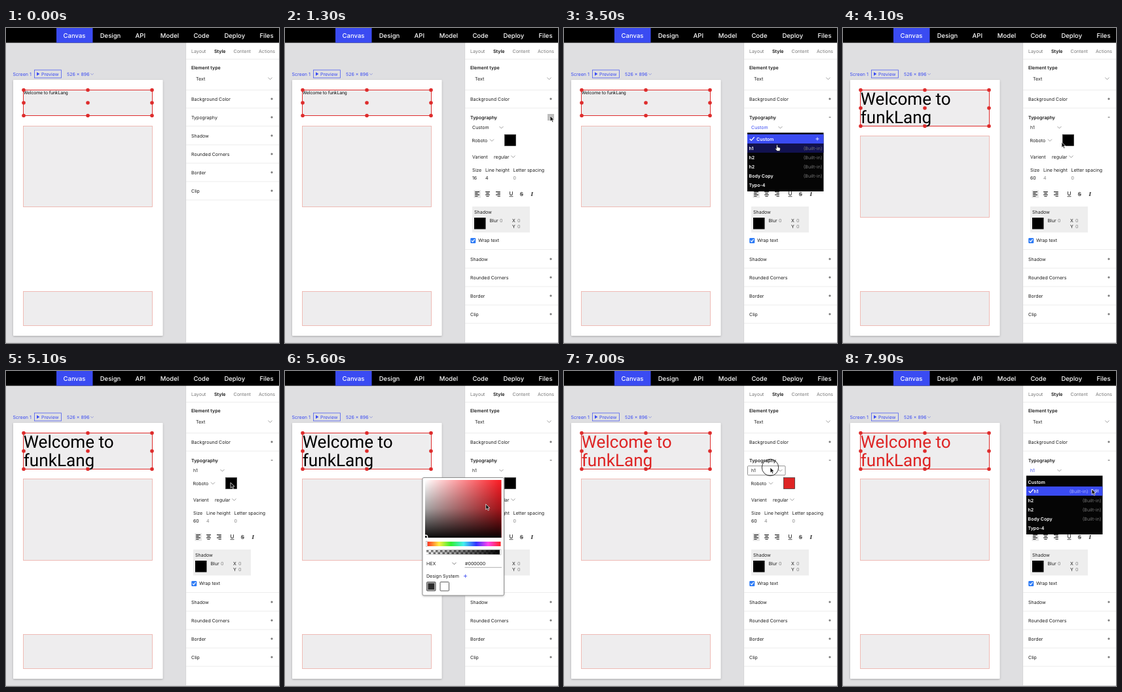
An HTML page that plays this animation: 417x480 px, repeating every 8 s.

```html
<!DOCTYPE html>
<html lang="en">
<head>
<meta charset="utf-8">
<title>Typography panel</title>
<style>
html, body { margin: 0; width: 100%; height: 100%; overflow: hidden; background: #dfdfe1; }
svg { display: block; width: 417px; height: 480px; font-family: Inter, Roboto, sans-serif; text-rendering: geometricPrecision; }
</style>
</head>
<body>
<svg id="stage" viewBox="0 0 417 480" xmlns="http://www.w3.org/2000/svg">
  <defs>
    <linearGradient id="tint"><stop stop-color="#fff"/><stop offset="1" stop-color="#fb1a22"/></linearGradient>
    <linearGradient id="shade" x2="0" y2="1"><stop stop-color="#000" stop-opacity="0"/><stop offset=".5" stop-opacity=".36"/><stop offset="1" stop-opacity=".96"/></linearGradient>
    <linearGradient id="hue"><stop stop-color="#f22"/><stop offset=".17" stop-color="#fe4"/><stop offset=".33" stop-color="#3e3"/><stop offset=".5" stop-color="#4ee"/><stop offset=".67" stop-color="#33f"/><stop offset=".83" stop-color="#f4e"/><stop offset="1" stop-color="#f22"/></linearGradient>
    <linearGradient id="fade"><stop stop-color="#de2424" stop-opacity="0"/><stop offset="1" stop-color="#de2424"/></linearGradient>
    <linearGradient id="fadeBlack"><stop stop-opacity="0"/><stop offset="1"/></linearGradient>
    <pattern id="checker" width="7" height="7" patternUnits="userSpaceOnUse" x="216" y="272.5"><path d="M0 0h3.5v7h3.5v-3.5h-7z" fill="#777"/></pattern>
    <filter id="soft" x="-20%" y="-20%" width="140%" height="140%"><feDropShadow dx="0" dy="1" stdDeviation="1.8" flood-opacity=".25"/></filter>
  </defs>
  <g id="scene"></g>
</svg>
<script>
const LOOP = 8000, STEP = 100;
const BLUE = '#3a4bf2', RED = '#de2c2c', INK = '#1c1c1c', MUTED = '#858585';
const scene = document.getElementById('scene');

// Moments at which the interface changes
const EXPAND = 1100, OPEN = 2200, CHOOSE = 3600, PICKER = 5300, PICK = 5700, DISMISS = 6500, REOPEN = 7100;

// Pointer path: time, x, y
const PATH = [
  [600, 372, 178], [1000, 405, 134], [1400, 405, 134], [1900, 316, 149], [2300, 316, 150],
  [2900, 328, 168], [3400, 325, 178], [3700, 325, 178], [4500, 343, 170], [5300, 343, 170],
  [5700, 300, 209], [5900, 303, 203], [6100, 307, 197], [6400, 343, 236], [6500, 343, 236],
  [6900, 315, 147], [7200, 315, 147], [7800, 380, 180], [8000, 380, 180]
];

const rect = (x, y, w, h, fill, extra = '') =>
  `<rect x="${x}" y="${y}" width="${w}" height="${h}" fill="${fill}" ${extra}/>`;
const path = (d, stroke, width = 0.8, fill = 'none') =>
  `<path d="${d}" fill="${fill}" stroke="${stroke}" stroke-width="${width}"/>`;
// y is the vertical middle of the line
const text = (x, y, str, { size = 7.05, fill = INK, weight = 400, anchor = 'start', extra = '' } = {}) =>
  `<text x="${x}" y="${y + size * 0.36}" font-size="${size}" fill="${fill}" font-weight="${weight}" text-anchor="${anchor}" ${extra}>${str}</text>`;
const chevron = (x, y, color = '#777', r = 3) =>
  path(`M${x - r} ${y - r / 2}L${x} ${y + r / 2}L${x + r} ${y - r / 2}`, color, 0.7);
const plus = (x, y, color = '#333', r = 1.7) => path(`M${x - r} ${y}h${2 * r}M${x} ${y - r}v${2 * r}`, color);
const rule = y => path(`M275 ${y}H417`, '#ececec', 1);
const check = (x, y) => path(`M${x} ${y}l2.3 2.4l4.6 -5.2`, '#fff', 1.3);

function pointerAt(t) {
  if (t < PATH[0][0]) return null;
  const i = Math.max(1, PATH.findIndex(p => p[0] >= t));
  const [t0, x0, y0] = PATH[i - 1], [t1, x1, y1] = PATH[i];
  const k = (t - t0) / (t1 - t0), e = k * k * (3 - 2 * k);
  return { x: x0 + (x1 - x0) * e, y: y0 + (y1 - y0) * e };
}

function navBar() {
  const items = [['Canvas', 104.5], ['Design', 159.5], ['API', 205.3], ['Model', 250], ['Code', 298.5], ['Deploy', 349.3], ['Files', 398]];
  return rect(0, 0, 417, 22.5, '#000') + rect(77, 0, 55.5, 22.5, BLUE) +
    items.map(([s, x]) => text(x, 11.5, s, { size: 9.5, fill: '#fff', weight: 500, anchor: 'middle' })).join('');
}

function artboard(s) {
  const frame = (y, h) => rect(26.5, y, 197, h, '#eeedee', 'stroke="#eeb4ae" stroke-width=".9"');
  const bottom = s.large ? 149.5 : 133.5, mid = (94.5 + bottom) / 2;
  const roboto = 'font-family="Roboto, sans-serif"';
  const dots = [94.5, mid, bottom].flatMap(y => [27, 125, 223].map(x => [x, y]))
    .filter(([x, y]) => y !== mid || x !== 0);
  const words = s.large
    ? text(26.8, 107.6, 'Welcome to', { size: 26.1, fill: s.color, extra: roboto }) +
      text(26.8, 135.4, 'funkLang', { size: 26.1, fill: s.color, extra: roboto })
    : text(27, 98.2, 'Welcome to funkLang', { size: 7, fill: '#111', extra: roboto });
  return rect(0, 22, 275, 458, '#dfdfe1') +
    text(10.5, 70.2, 'Screen 1', { fill: BLUE }) +
    rect(43.5, 64, 41, 12, 'none', `stroke="${BLUE}" stroke-width=".7"`) +
    path('M47 67.3l4.4 2.7l-4.4 2.7z', 'none', 0, BLUE) +
    text(54, 70, 'Preview', { fill: BLUE }) +
    text(93, 70.2, '526 × 896', { fill: BLUE }) + chevron(131.5, 70.3, '#7780d8', 2.2) +
    rect(11, 79, 228.5, 390, '#fff', 'rx="1" filter="url(#soft)"') +
    frame(s.large ? 164.5 : 149.5, s.large ? 124 : 123) + frame(401.5, 52) +
    rect(26.5, 94.5, 197, bottom - 94.5, '#eeedee', `stroke="${RED}" stroke-width="1"`) + words +
    dots.map(([x, y]) => `<circle cx="${x}" cy="${y}" r="2.8" fill="${RED}"/>`).join('');
}

function typography(s) {
  const gray = { fill: MUTED };
  const alignIcon = (x, shift) => path([0, 1, 2, 3].map(i => {
    const w = i % 2 ? 4.3 : 6.8;
    return `M${x + (6.8 - w) * shift} ${249.6 + i * 2.3}h${w}`;
  }).join(''), '#333', 1.2);
  return text(286, 151.5, s.style, { fill: s.menu ? BLUE : INK }) + chevron(330.5, 151.5) +
    (s.hoverSelect ? rect(280.5, 144.7, 57.5, 14, 'none', 'rx="1" stroke="#777" stroke-width=".8"') : '') +
    text(285.5, 171, 'Roboto') + chevron(316, 171) +
    rect(335.5, 162.5, 17, 17, s.color, 'stroke="#333" stroke-width=".7"') +
    text(286, 196, 'Varient') + text(319, 196, 'regular') + chevron(348.5, 196) +
    text(286, 216, 'Size') + text(306, 216, 'Line height') + text(348.5, 216, 'Letter spacing') +
    text(286, 228.5, s.large ? '60' : '16') + text(306, 228.5, '4', s.large ? gray : {}) + text(348.5, 228.5, '0', gray) +
    rect(288.5, 247, 10.5, 12, '#e7e7e7') +
    alignIcon(290.2, 0) + alignIcon(306.1, 0.5) + alignIcon(322, 1) +
    text(345.5, 252.5, 'U', { size: 8, weight: 500, anchor: 'middle', extra: 'text-decoration="underline"' }) +
    text(361.3, 253, 'S', { size: 8, weight: 500, anchor: 'middle', extra: 'text-decoration="line-through"' }) +
    text(377.3, 253, 'I', { size: 9, weight: 700, anchor: 'middle', extra: 'font-style="italic" font-family="Liberation Serif, serif"' }) +
    rect(286, 272, 88, 39.5, '#eee') + text(289, 280.5, 'Shadow') + rect(289, 289, 17.5, 17.5, '#000') +
    text(312.5, 293, 'Blur') + text(328, 293, '0', gray) +
    text(347, 293, 'X') + text(355, 293, '0', gray) + text(347, 302.3, 'Y') + text(355, 302.3, '0', gray) +
    rect(283.3, 320, 8, 8, '#2d7bf6', 'rx="1.3"') + path('M285 323.9l1.7 1.9l3 -3.9', '#fff', 1.2) +
    text(295, 323.8, 'Wrap text');
}

function panel(s) {
  const tabs = [['Layout', 283], ['Style', 318], ['Content', 347.5], ['Actions', 386]];
  const row = (label, y) => text(283, y, label) + plus(406, y) + rule(y + 14);
  const shift = s.expanded ? 188 : 0;
  return rect(275, 22, 142, 458, '#fff') + path('M274.7 22V480', '#cfcfd2', 0.6) +
    tabs.map(([label, x], i) => text(x, 35, label, i === 1 ? { weight: 600, fill: '#111' } : { fill: '#777' })).join('') +
    rule(47.5) +
    text(283, 60.3, 'Element type', { weight: 600 }) + text(290, 77, 'Text') + chevron(403.5, 77) +
    rule(94.5) + row('Background Color', 108) +
    (s.pressed ? rect(401, 131, 10, 10, '#bdbdbd') : '') +
    text(283, 136, 'Typography', { weight: s.expanded ? 600 : 400 }) +
    (s.expanded ? path('M404.7 136h2.8', '#333') + typography(s) : plus(406, 136)) +
    rule(149.5 + shift) +
    ['Shadow', 'Rounded Corners', 'Border', 'Clip'].map((label, i) => row(label, 164 + shift + 28 * i)).join('');
}

function menu(s) {
  const rows = ['Custom', 'h1', 'h2', 'h2', 'Body Copy', 'Typo-4'];
  const hover = Math.floor((s.pointer.y - 160) / 14);
  return rect(280, 159.5, 116.5, 89.5, '#050505') + rows.map((label, i) => {
    const y = 169 + 14 * i, chosen = i === (s.large ? 1 : 0);
    const back = chosen ? BLUE : i === hover ? '#12124f' : '';
    const x = !chosen ? 282.5 : i ? 291.5 : 294;
    const builtIn = i > 0 && i < 5;
    return (back ? rect(280, y - 7, 116.5, 14, back) : '') + (chosen ? check(283.8, y) : '') +
      text(x, y, label, { fill: '#fff', weight: 600 }) +
      (builtIn ? text(chosen ? 374.5 : 394.5, y, '(Built-in)', { fill: chosen ? '#a9b1fa' : '#777', anchor: 'end' }) : '') +
      (chosen ? (i ? text(379, y, 'Edit', { fill: '#fff', size: 6.5 }) : plus(387, y, '#fff', 2.5)) : '');
  }).join('');
}

function picker(s) {
  const ring = s.picked ? [300.5, 209.5] : [215, 253];
  const swatch = (x, fill, edge) =>
    rect(x, 321.5, 13.5, 13.5, edge, 'rx="1" stroke="#333" stroke-width=".8"') + rect(x + 2, 323.5, 9.5, 9.5, fill);
  return rect(210, 162.5, 124.5, 179.5, '#fff', 'rx="2" stroke="#777" stroke-width=".8" filter="url(#soft)"') +
    rect(214, 166, 116.5, 88, 'url(#tint)') + rect(214, 166, 116.5, 88, 'url(#shade)') +
    `<circle cx="${ring[0]}" cy="${ring[1]}" r="2.7" fill="none" stroke="#fff" stroke-width="1.4"/>` +
    rect(216, 260, 113.5, 7, 'url(#hue)') + rect(215.5, 259.5, 2, 8, '#fff', 'stroke="#888" stroke-width=".4"') +
    rect(216, 272.5, 113.5, 7, '#fff') + rect(216, 272.5, 113.5, 7, 'url(#checker)') +
    rect(216, 272.5, 113.5, 7, s.picked ? 'url(#fade)' : 'url(#fadeBlack)') +
    rect(328, 272, 2, 8, '#fff', 'stroke="#888" stroke-width=".4"') +
    text(216, 293.3, 'HEX') + chevron(258.5, 293.3, '#444') +
    text(275, 293.3, s.picked ? '#de2424' : '#000000') + path('M274.5 299.3H331', '#777', 0.6) +
    text(216, 312.5, 'Design System') + plus(275.5, 312.5, BLUE, 2.6) +
    swatch(216.5, '#2b2b2b', '#aaa') + swatch(237, '#fff', '#fff');
}

function cursor(s) {
  if (!s.pointer) return '';
  const { x, y } = s.pointer;
  const arrow = 'M0 0V8.3L2 6.5L3.4 9.6L4.9 8.9L3.5 5.9H6.1Z';
  const hand = 'M-.4 .6q.9 -1.1 1.7 0v3l3 .6q1.5 .4 1.1 2l-.7 3.3h-4.2l-3 -3.7q.4 -1.2 1.9 .2z';
  return (s.ring ? `<circle cx="${x}" cy="${y}" r="12.7" fill="none" stroke="#222" stroke-width=".9"/>` : '') +
    `<path transform="translate(${x} ${y})" d="${s.hand ? hand : arrow}" fill="${s.hand ? '#fff' : '#111'}" stroke="${s.hand ? '#111' : '#fff'}" stroke-width=".7"/>`;
}

function stateAt(t) {
  const within = (a, b) => t >= a && t < b;
  const large = t >= CHOOSE, picked = t >= PICK;
  return {
    large, picked,
    expanded: t >= EXPAND,
    style: large ? 'h1' : 'Custom',
    color: picked ? '#de2424' : '#000',
    menu: within(OPEN, CHOOSE) || t >= REOPEN,
    picker: within(PICKER, DISMISS),
    pressed: within(1000, 1500),
    hoverSelect: within(1900, OPEN) || within(6900, REOPEN),
    ring: within(6900, 7200),
    hand: within(2700, 3800),
    pointer: pointerAt(t)
  };
}

function render(t) {
  const s = stateAt(t);
  scene.innerHTML = artboard(s) + panel(s) + navBar() + path('M0 479.5H417', '#cfcfd2', 1) +
    (s.menu ? menu(s) : '') + (s.picker ? picker(s) : '') + cursor(s);
}

const start = performance.now();
let shown = -1;
function tick() {
  const t = Math.floor(((performance.now() - start) % LOOP) / STEP) * STEP;
  if (t !== shown) render(shown = t);
  requestAnimationFrame(tick);
}
tick();
</script>
</body>
</html>
```
